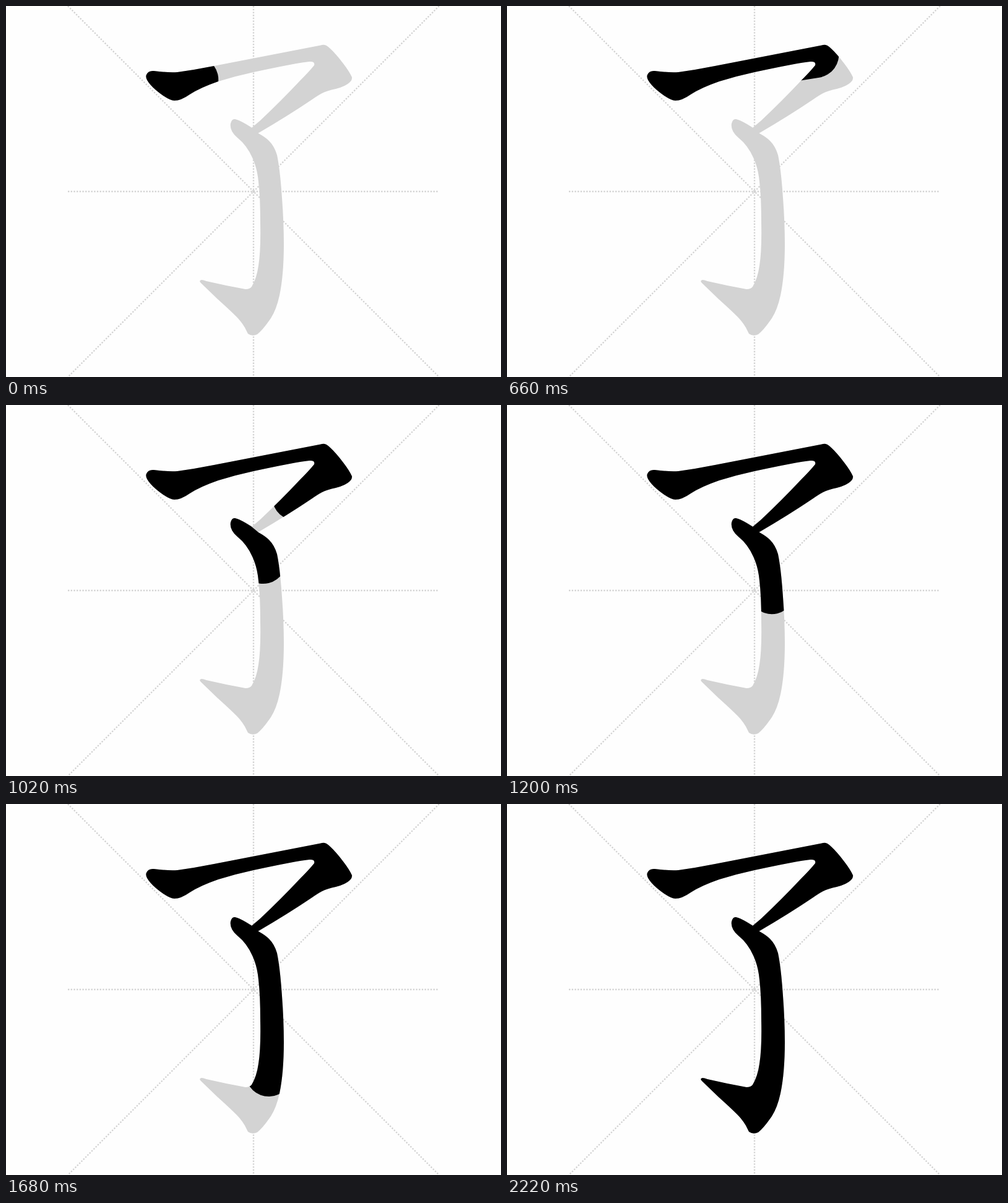
Write an HTML page that moves like this. It is 800x600 px and loops after 2.28 s.

```html
<!DOCTYPE html>
<html lang="zh">
<head>
<meta charset="utf-8">
<title>Stroke order</title>
<style>
  html, body { margin: 0; width: 100%; height: 100%; overflow: hidden; background: #fefefe; }
  svg { display: block; width: 100%; height: 100%; }
</style>
</head>
<body>
<svg viewBox="0 0 800 600">
  <g transform="translate(100 0) scale(2.34375)" stroke="#d3d3d3" stroke-width="1" stroke-dasharray="1 1">
    <line x1="0" y1="0" x2="256" y2="256"/>
    <line x1="256" y1="0" x2="0" y2="256"/>
    <line x1="128" y1="0" x2="128" y2="256"/>
    <line x1="0" y1="128" x2="256" y2="128"/>
  </g>
  <g id="shadow" fill="#d3d3d3"></g>
  <g id="ink" fill="none" stroke="#000" stroke-linecap="round"></g>
</svg>
<script>
const LOOP = 2280, STEP = 60, FILL_AT = 2220, BRUSH = 75;

// outline: glyph part; median: brush route; the tip is at start + speed * time
const strokes = [
  {
    outline: `M277 107 Q306 103 336 97 L511 63 Q517 62 523 68 Q533 77 545 93
      Q555 106 559 115 Q560 119 556 123 Q549 130 533 134 Q519 137 511 141
      Q505 144 495 151 Q455 178 407 206 L392 212 L390 203 Q398 196 410 186
      Q444 154 474 122 Q490 106 498 96 Q500 89 490 90 Q470 92 400 107
      Q372 113 343 122 Q314 132 297 143 Q283 153 272 153 Q266 153 254 145
      Q241 136 234 128 Q224 117 227 111 Q230 104 239 105 Q262 108 277 107Z`,
    median: 'M238 113 L270 126 L305.7 119 L427.6 90 L503 78 L522 107 L511 117 L398 201',
    start: 71,
    speed: 0.299
  },
  {
    outline: `M363 190 Q365 182 370 183 Q377 184 396 196 L408 206 Q419 212 425 218
      Q434 227 438 241 Q443 265 446 310 Q449 350 449 385 Q449 435 442 468
      Q437 491 428 505 Q415 524 406 531 Q398 535 391 530 Q390 528 386 520
      Q380 510 372 502 Q362 492 342 474 L315 448 Q311 444 316 443
      Q319 443 324 445 Q354 452 387 458 Q394 458 397 454 Q405 441 408 420
      Q412 395 411 350 Q411 310 408 284 Q406 262 398 245 Q389 225 374 213
      Q361 202 363 190Z`,
    median: 'M372 192 L389 209 L414 245 L428 301.5 L430 365 L425 434.5 L405 488 L379 478.7 L318 446',
    start: -212.5,
    speed: 0.2815
  }
];

function add(parent, tag, attrs) {
  const el = document.createElementNS('http://www.w3.org/2000/svg', tag);
  for (const name in attrs) el.setAttribute(name, attrs[name]);
  return parent.appendChild(el);
}

const svg = document.querySelector('svg');
const shadow = document.getElementById('shadow');
const ink = document.getElementById('ink');

strokes.forEach((stroke, i) => {
  const clip = add(svg, 'clipPath', { id: 'clip' + i });
  add(clip, 'path', { d: stroke.outline });
  add(shadow, 'path', { d: stroke.outline });
  stroke.brush = add(ink, 'path', { d: stroke.median, 'clip-path': `url(#clip${i})` });
});

function draw(time) {
  const t = Math.floor((time % LOOP) / STEP) * STEP;
  for (const { brush, start, speed } of strokes) {
    const tip = start + speed * t;
    brush.setAttribute('visibility', tip > 0 ? 'visible' : 'hidden');
    brush.setAttribute('stroke-dasharray', `${Math.max(tip, 0.01)} 2000`);
    brush.setAttribute('stroke-width', t >= FILL_AT ? BRUSH * 8 : BRUSH);
  }
}

const begin = performance.now();
function tick() {
  draw(performance.now() - begin);
  requestAnimationFrame(tick);
}
tick();
</script>
</body>
</html>
```
